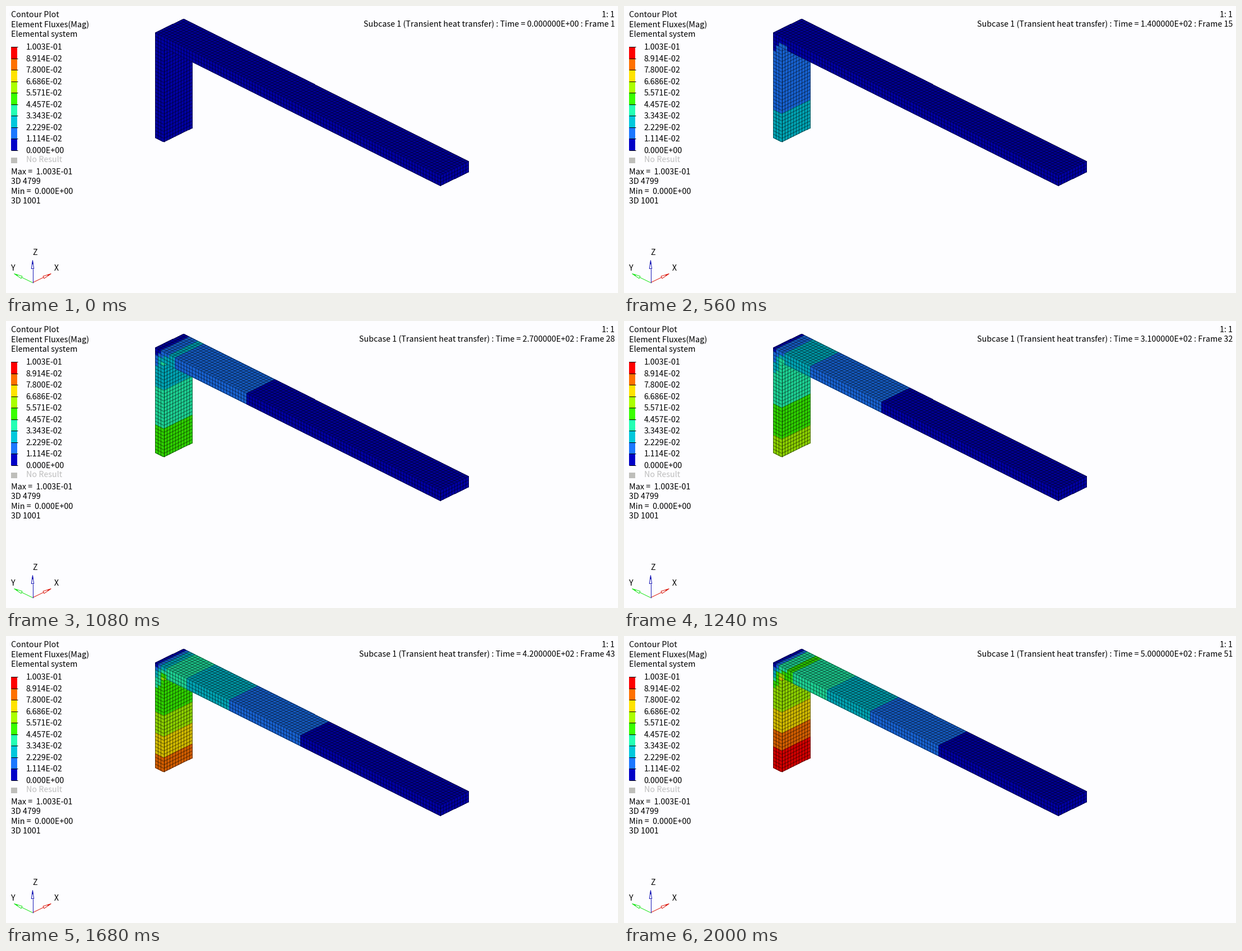
A matplotlib script for the animation above (2040 ms loop, 1092 by 513 pixels).

```python
import numpy as np
import matplotlib.pyplot as plt
from matplotlib.animation import FuncAnimation
from matplotlib.collections import LineCollection, PolyCollection
from matplotlib.patches import Polygon, Rectangle

W, H, DPI = 1092, 513, 100
STEPS, INTERVAL = 51, 40
PX = 72 / DPI  # one pixel in points

plt.rcParams["font.family"] = ["Noto Sans CJK JP", "DejaVu Sans"]
plt.rcParams["font.size"] = 14.28 * PX

# Contour bands from low to high
BANDS = np.array([
    (0, 0, 200), (28, 120, 255), (0, 200, 220), (36, 255, 180), (57, 255, 0),
    (170, 255, 0), (255, 227, 0), (255, 113, 0), (255, 0, 0)]) / 255
PEAK = 0.100285

fig = plt.figure(figsize=(W / DPI, H / DPI), dpi=DPI, facecolor="#fdfdff")
ax = fig.add_axes([0, 0, 1, 1])
ax.set_xlim(0, W)
ax.set_ylim(H, 0)
ax.axis("off")


def label(x, y, s, **kw):
    return ax.text(x, y, s, va="baseline", **kw)


def stroke(xs, ys, color, lw=1.0, **kw):
    ax.plot(xs, ys, color=color, lw=lw * PX, solid_capstyle="butt", **kw)


# ---- mesh: an L bracket, 100 x 10 x 3 beam on a 3 x 10 x 27 leg ----
LENGTH, DEPTH, THICK, TALL = 100, 10, 3, 30


def project(i, j, k):
    """Element coordinates (along, across, down) to pixels."""
    return (266.3 + 5.086 * i + 5.05 * j, 48 + 2.546 * i - 2.48 * j + 6.24 * k)


def face(place, a0, a1, b0, b1):
    """Quads and grid lines of a flat patch; place maps (a, b) to (i, j, k)."""
    def pt(a, b):
        return project(*place(a, b))
    cells = [(a, b) for a in range(a0, a1) for b in range(b0, b1)]
    quads = [[pt(a, b), pt(a + 1, b), pt(a + 1, b + 1), pt(a, b + 1)]
             for a, b in cells]
    lines = [[pt(a, b0), pt(a, b1)] for a in range(a0, a1 + 1)]
    lines += [[pt(a0, b), pt(a1, b)] for b in range(b0, b1 + 1)]
    return cells, quads, lines


class Patch:
    def __init__(self, place, spans, owner, shade, z):
        cells, quads, lines = face(place, *spans)
        self.ik = np.array([owner(a, b) for a, b in cells])
        self.shade = shade
        self.art = PolyCollection(quads, edgecolors="none", linewidths=0,
                                  antialiaseds=False, zorder=z)
        ax.add_collection(self.art)
        ax.add_collection(LineCollection(lines, colors=(0, 0, 0, 0.6),
                                         linewidths=0.8 * PX, zorder=z + 0.5))

    def paint(self, t):
        u = flux(self.ik[:, 0], self.ik[:, 1], t)
        band = np.clip(np.floor(u), 0, 8).astype(int)
        self.art.set_facecolor(BANDS[band] * self.shade)


# ---- flux, in units of one contour band ----
TIMES = [0, 7, 14, 21, 27, 35, 42, 50]
# leg values at three heights
LEG_K = [4, 17, 30]
LEG_U = np.array([
    (0, 0, 0), (0.35, 0.78, 1.26), (1.1, 1.72, 2.5), (1.75, 2.73, 3.7),
    (2.3, 3.54, 4.8), (3.25, 4.65, 6.4), (3.85, 5.47, 7.72),
    (4.75, 6.68, 9.1)])
# how far the first band reaches along the beam, and the decay rate
REACH = [-90, -34, 3, 21.3, 32.3, 44, 51.1, 58.3]
DECAY = [0.029, 0.029, 0.029, 0.029, 0.0293, 0.0287, 0.0297, 0.0304]
# share of the beam flux inside the corner block, rows downwards
CORNER = np.array([(0.12, 0.40, 0.70), (0.40, 0.62, 0.88), (0.65, 0.95, 1.25)])
LEG_SIDE = np.array([-0.45, -0.05, 0.40])
BEAM_SIDE = np.array([-0.25, 0.0, 0.28])


def flux(i, k, t):
    reach, decay = np.interp(t, TIMES, REACH), np.interp(t, TIMES, DECAY)

    def beam_at(x):
        d = reach - x
        return np.exp(decay * d - 6.3e-5 * d * d)

    ic, kc = np.minimum(i, 2), np.minimum(k, 2)
    beam = beam_at(i + 0.5)
    beam = beam * (1 + BEAM_SIDE[kc] * np.exp(-np.maximum(i - 3, 0) / 0.9))
    knots = [np.interp(t, TIMES, LEG_U[:, n]) for n in range(3)]
    leg = np.polyval(np.polyfit(LEG_K, knots, 2), k + 0.5)
    leg = leg * (1 + LEG_SIDE[ic] * np.exp(-np.maximum(k - 3, 0) / 1.2))
    block = beam_at(3.5) * CORNER[kc, ic]
    return np.where(k >= THICK, leg, np.where(i >= THICK, beam, block))


SIDE, TOP = 0.81, 0.74
patches = [
    # inner face of the leg, partly hidden by the beam
    Patch(lambda j, k: (THICK, j, k), (0, DEPTH, THICK, TALL),
          lambda j, k: (THICK - 1, k), SIDE, 1),
    Patch(lambda i, k: (i, 0, k), (0, THICK, THICK, TALL),
          lambda i, k: (i, k), SIDE, 2),
    Patch(lambda i, k: (i, 0, k), (0, LENGTH, 0, THICK),
          lambda i, k: (i, k), SIDE, 3),
    Patch(lambda j, k: (LENGTH, j, k), (0, DEPTH, 0, THICK),
          lambda j, k: (LENGTH - 1, k), SIDE, 3),
    Patch(lambda i, j: (i, j, 0), (0, LENGTH, 0, DEPTH),
          lambda i, j: (i, 0), TOP, 4),
]

# ---- titles and legend ----
for n, s in enumerate(["Contour Plot", "Element Fluxes(Mag)",
                       "Elemental system"]):
    label(9, 20.5 + 17.3 * n, s)

BAR_TOP, STEP = 73, 20.55
for n in range(10):
    y = BAR_TOP + STEP * n
    if n < 9:
        ax.add_patch(Rectangle((9, y), 11, STEP, fc=BANDS[8 - n], lw=0))
    stroke([9, 21], [y, y], "black", zorder=3)
    label(35.5, y + 5, f"{PEAK * (9 - n) / 9:.3E}")

ax.add_patch(Rectangle((9, 271), 11, 10, fc="#bebeba", lw=0))
label(35.5, 279, "No Result", color="#bebebe")

for n, s in enumerate([f"Max =  {PEAK:.3E}", "3D 4799",
                       f"Min =  {0:.3E}", "3D 1001"]):
    label(9, 301 + 17.3 * n, s)

label(1086, 20, "1: 1", ha="right")
caption = label(1086.5, 37, "", ha="right")


# ---- axis triad ----
def arrow(tip, color):
    o, tip = np.array([47.5, 494.5]), np.array(tip)
    d = (tip - o) / np.hypot(*(tip - o))
    side = np.array([-d[1], d[0]])
    base = tip - 15 * d
    stroke(*zip(o, base), color)
    ax.add_patch(Polygon([tip, base + 2.2 * side, base - 2.2 * side],
                         fill=False, ec=color, lw=PX))
    ax.add_patch(Polygon([tip, tip - 7 * d + 1.3 * side,
                          tip - 7 * d - 1.3 * side], fc=color, lw=0))


arrow((80.5, 478.5), "#dc1e14")
arrow((14.5, 478.5), "#1ee61e")
arrow((47.5, 454.5), "#1414b4")
label(51.5, 445, "Z", ha="center")
label(90, 473, "X", ha="center")
label(12, 473, "Y", ha="center")


def update(n):
    for p in patches:
        p.paint(n)
    caption.set_text(f"Subcase 1 (Transient heat transfer) : "
                     f"Time = {10 * n:.6E} : Frame {n + 1}")
    return [p.art for p in patches] + [caption]


anim = FuncAnimation(fig, update, frames=STEPS, interval=INTERVAL,
                     repeat=True, repeat_delay=0, init_func=lambda: update(0))
plt.show()
```
